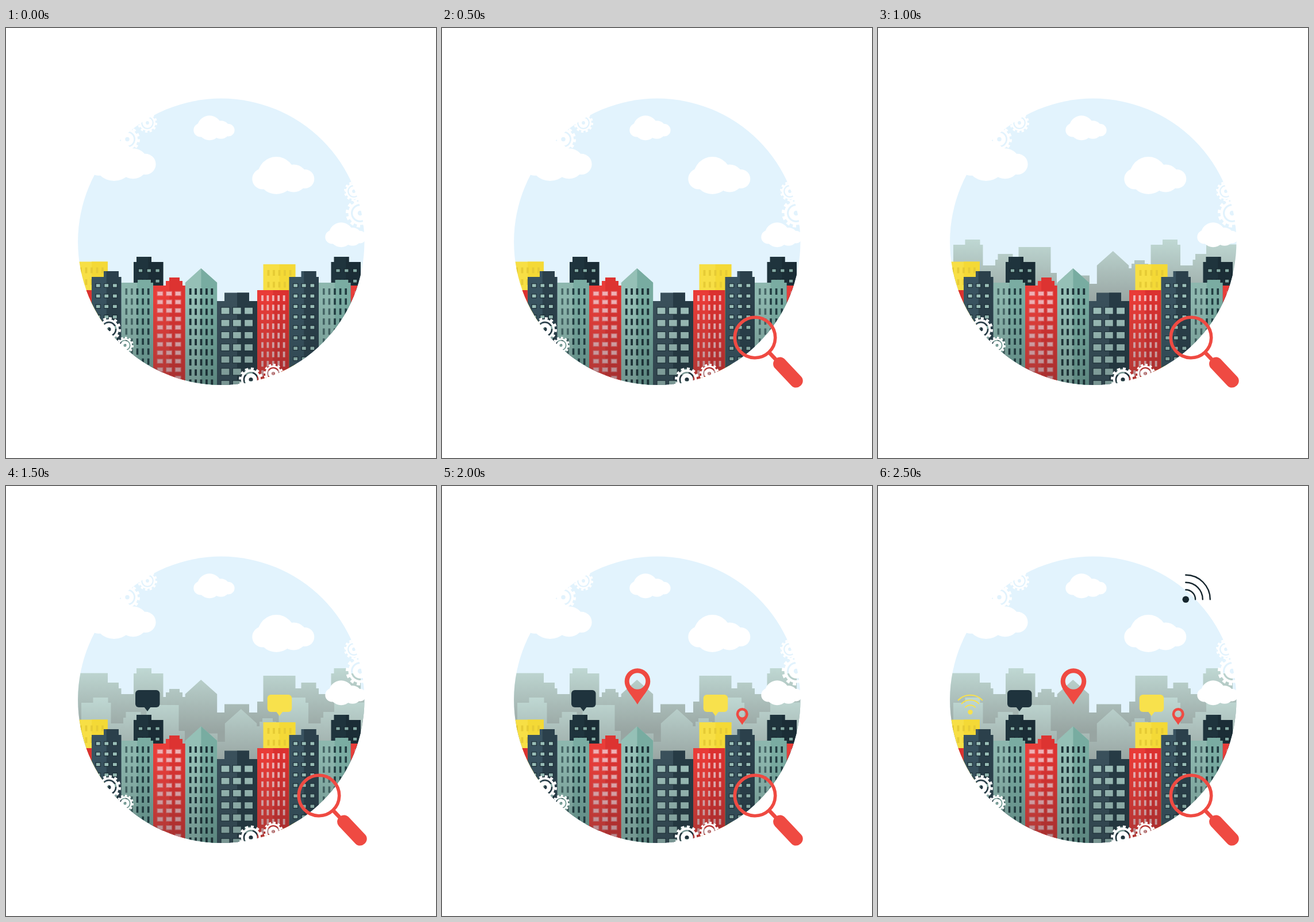
These frames come from a looping animation (748x748 px, 3000 ms). An HTML page:

```html
<!DOCTYPE html>
<html lang="en">
<head>
<meta charset="utf-8">
<title>City scene</title>
<style>
  html, body { margin: 0; width: 100%; height: 100%; overflow: hidden; background: #fff; }
  svg { display: block; width: 100vw; height: 100vh; }
</style>
</head>
<body>
<svg id="stage" viewBox="0 0 748 748"></svg>
<script>
const LOOP = 3000;
const BASE = 630;
const PERIOD = 343.5;
const RED = '#ef4a42';
const NAVY = '#1f333d';
const YELLOW = '#f8e14c';

const circle = (x, y, r, attrs) => `<circle cx="${x}" cy="${y}" r="${r}" ${attrs}/>`;
const rect = (x, y, w, h, attrs) => `<rect x="${x}" y="${y}" width="${w}" height="${h}" ${attrs}/>`;
const path = (d, attrs) => `<path d="${d}" ${attrs}/>`;
const group = (body, attrs) => `<g ${attrs}>${body}</g>`;

// Roof points are relative to the upper left corner of the wall.
const kinds = {
  tower: {
    w: 51.5, roof: [[21, 0], [21, -10], [47, -10], [47, 0]], colors: ['#395360', '#2b404b'],
    win: { cols: 3, first: 11.2, gap: 14.6, w: 8, h: 6.5, y: 15, step: 18.2, fill: '#9bc0b9', stroke: '#1b2d36' }
  },
  backTower: {
    w: 51.5, roof: [[5, 0], [5, -9], [31, -9], [31, 0]], colors: ['#1f343d', '#1b2d36'],
    win: { cols: 3, first: 12, gap: 14.8, w: 7.5, h: 6, y: 15, step: 18.2, fill: '#83aaa4', stroke: '#15242b' }
  },
  teal: {
    w: 55.7, roof: [[29, 0], [29, -5], [51, -5], [51, 0]], colors: ['#8db7ae', '#7aaca2'],
    win: { cols: 5, first: 9, gap: 9.6, w: 3.6, h: 11, y: 15.5, step: 17.4, fill: '#223d42', dim: .65 }
  },
  gable: {
    w: 55.5, roof: [[27.5, -25]], colors: ['#95c0b6', '#78aca1'],
    win: { cols: 5, first: 9, gap: 9.4, w: 3.8, h: 11, y: 15.5, step: 17.6, fill: '#1d3238' }
  },
  red: {
    w: 56, roof: [[22, 0], [22, -8], [28, -8], [28, -14], [46, -14], [46, -8], [51, -8], [51, 0]],
    colors: ['#e93d39', '#dd3331'],
    win: { cols: 3, first: 12, gap: 15.6, w: 10, h: 7.5, y: 14, step: 14.7, fill: '#efb0b4', stroke: '#e0686a' }
  },
  narrowRed: {
    w: 55.3, roof: [], colors: ['#e93b37', '#db3130'],
    win: { cols: 5, first: 9, gap: 9.4, w: 3.8, h: 10, y: 14, step: 16.3, fill: '#f0b4b6' }
  },
  block: {
    w: 70, roof: [[13, 0], [13, -14.5], [56, -14.5], [56, 0]], colors: ['#3a505b', '#273b45'],
    win: { cols: 3, first: 14.5, gap: 20.3, w: 15, h: 12, y: 17, step: 21.2, fill: '#a0c2bc', stroke: '#22353e' }
  },
  yellow: {
    w: 56, roof: [], colors: ['#f7df45', '#f4d936'],
    win: { cols: 5, first: 9, gap: 9.5, w: 3.8, h: 10, y: 15, step: 20.5, fill: '#e6cb35' }
  }
};

const city = [
  ['yellow', 121, 406.5], ['yellow', 447.5, 411],
  ['backTower', 222, 407], ['backTower', 222 + PERIOD, 407],
  ['narrowRed', 437 - PERIOD, 456], ['narrowRed', 437, 456],
  ['red', 256, 448], ['red', 256 + PERIOD, 448],
  ['teal', 200.3, 443], ['teal', 200.3 + PERIOD, 443],
  ['tower', 149, 433], ['tower', 149 + PERIOD, 433],
  ['gable', 311.7, 443], ['block', 367, 475]
];

function outline([name, x, top]) {
  const { w, roof } = kinds[name];
  const points = [[0, BASE - top], [0, 0], ...roof, [w, 0], [w, BASE - top]];
  return 'M' + points.map(([px, py]) => `${x + px} ${top + py}`).join('L') + 'Z';
}

function windows([name, x, top]) {
  const { win } = kinds[name];
  let out = '';
  for (let y = top + win.y; y < BASE; y += win.step) {
    for (let c = 0; c < win.cols; c++) {
      const cx = x + win.first + c * win.gap;
      const dim = win.dim && c < 2 ? `opacity="${win.dim}"` : '';
      const edge = win.stroke ? `stroke="${win.stroke}" stroke-width="1.2"` : '';
      out += rect(cx - win.w / 2, y - win.h / 2, win.w, win.h, `fill="${win.fill}" ${edge} ${dim}`);
    }
  }
  return out;
}

function building(item, i) {
  const [name, x, top] = item;
  const { w, colors } = kinds[name];
  const d = outline(item);
  return `<clipPath id="b${i}">${path(d, '')}</clipPath>` +
    path(d, `fill="${colors[0]}"`) +
    rect(x + w / 2, top - 30, w / 2, BASE - top + 30, `fill="${colors[1]}" clip-path="url(#b${i})"`) +
    windows(item) + path(d, 'fill="url(#shade)"');
}

function cloud(x, y, s) {
  const lobes = [[0, 0, 32.5], [-24, 6, 18], [30, 5, 24], [49.5, 6, 16.5]];
  return group(lobes.map(l => circle(...l, '')).join(''),
    `transform="translate(${x} ${y}) scale(${s})" fill="#fff"`);
}

function gear(x, y, r) {
  return group(
    circle(x, y, r * .9, `stroke-width="${r * .2}" pathLength="24" stroke-dasharray="1 1"`) +
    circle(x, y, r * .73, `stroke-width="${r * .18}"`) +
    circle(x, y, r * .34, `stroke-width="${r * .34}"`),
    'fill="none" stroke="#fff"');
}

function bubble(x, y, fill) {
  return group(rect(x, y, 42.5, 30, 'rx="6"') +
    path(`M${x + 15} ${y + 29}h12l-6 8z`, ''), `fill="${fill}"`);
}

function pin(x, y, r, hole, tip) {
  const ring = q => `M${x - q} ${y}a${q} ${q} 0 1 1 ${2 * q} 0`;
  return path(`${ring(r)}C${x + r} ${y + r * .62} ${x + r * .5} ${y + r} ${x} ${tip}` +
    `C${x - r * .5} ${y + r} ${x - r} ${y + r * .62} ${x - r} ${y}Z` +
    `${ring(hole)}a${hole} ${hole} 0 1 1 ${-2 * hole} 0Z`, `fill="${RED}" fill-rule="evenodd"`);
}

function signal(x, y, dot, radii, from, to, width, color) {
  const at = (r, deg) => {
    const a = deg * Math.PI / 180;
    return `${x + r * Math.cos(a)} ${y + r * Math.sin(a)}`;
  };
  const arcs = radii.map(r => `M${at(r, from)}A${r} ${r} 0 0 1 ${at(r, to)}`).join('');
  return circle(x, y, dot, `fill="${color}"`) +
    path(arcs, `fill="none" stroke="${color}" stroke-width="${width}" stroke-linecap="round"`);
}

function magnifier() {
  return group(
    circle(0, 0, 35.2, `fill="none" stroke="${RED}" stroke-width="5.6"`) +
    rect(36, -3.3, 20, 6.6, `fill="${RED}"`) +
    rect(51.5, -11.6, 63.8, 23.2, `rx="11" fill="${RED}"`),
    'transform="translate(544.5 538.5) rotate(46.5)"');
}

const fade = (id, y1, y2, a, b) =>
  `<linearGradient id="${id}" gradientUnits="userSpaceOnUse" x1="0" x2="0" y1="${y1}" y2="${y2}">` +
  `<stop ${a}/><stop offset="1" ${b}/></linearGradient>`;

const skyline = city.map(outline).join('');
const step = (time, body) => group(body, `data-from="${time}"`);

const stage = document.getElementById('stage');
stage.innerHTML =
  '<defs>' +
  fade('shade', 470, 625, 'stop-color="#18282c" stop-opacity="0"', 'stop-color="#18282c" stop-opacity=".3"') +
  fade('haze', 398, 508, 'stop-color="#bfd8d3"', 'stop-color="#98a5a2"') +
  `<clipPath id="disc">${circle(374.3, 371.8, 249.2, '')}</clipPath></defs>` +
  group(
    rect(120, 118, 510, 510, 'fill="#e2f3fd"') +
    step(1500, path(skyline, 'fill="url(#haze)" transform="translate(0 -81)"')) +
    step(1000, path(skyline, 'fill="url(#haze)" transform="translate(748 -30) scale(-1 1)"')) +
    city.map(building).join(''),
    'clip-path="url(#disc)"') +
  cloud(354, 173.7, .66) + cloud(470.3, 256.5, 1) + cloud(583, 359.7, .66) + cloud(188, 230.3, 1.1) +
  [[246, 165, 17], [211, 193.5, 22], [605, 284, 17], [616, 322, 25],
    [179, 524, 21], [207, 552, 15], [426, 611.5, 21], [465, 601, 17]].map(g => gear(...g)).join('') +
  step(1500, bubble(225, 355, NAVY) + bubble(454.7, 363, YELLOW)) +
  step(2000, pin(340, 339.5, 22.3, 14.3, 380) + pin(522.2, 396.5, 10.5, 6, 415.5)) +
  step(2500,
    signal(535.3, 197.3, 5.8, [16.8, 29.5, 42.5], -90, 0, 2.4, '#16262e') +
    signal(160.5, 393.3, 4.2, [12, 21, 29.5], -135, -45, 2, YELLOW)) +
  step(500, magnifier());

const steps = [...stage.querySelectorAll('[data-from]')];
function draw(t) {
  for (const el of steps) el.setAttribute('visibility', t >= +el.dataset.from ? 'visible' : 'hidden');
}

const start = performance.now();
function tick() {
  draw((performance.now() - start) % LOOP);
  requestAnimationFrame(tick);
}
tick();
</script>
</body>
</html>
```
